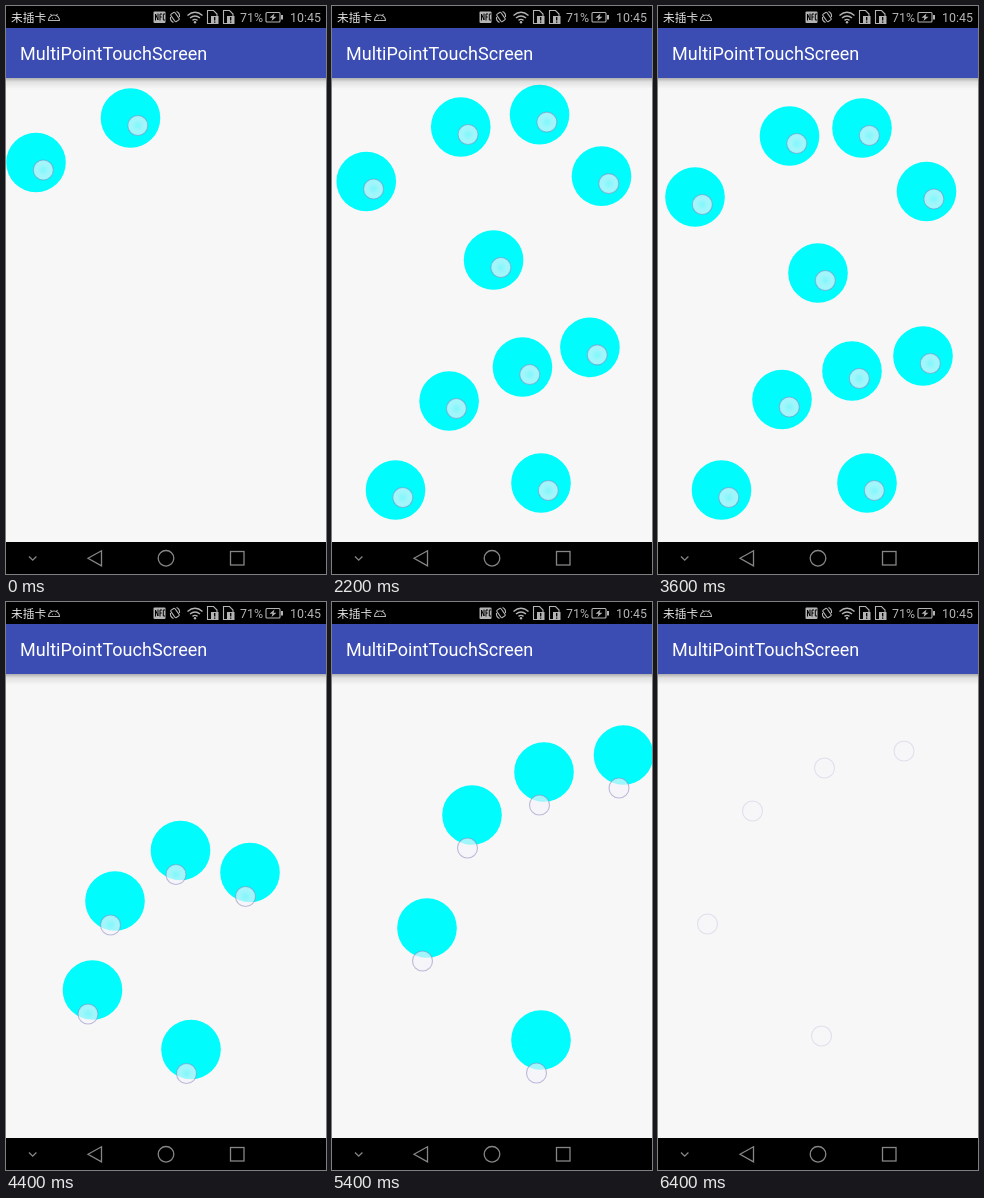
Write an HTML page that moves like this. It is 320 px wide and 568 px high and loops after 6600 ms.

```html
<!DOCTYPE html>
<html lang="en">
<head>
<meta charset="utf-8">
<title>MultiPointTouchScreen</title>
<style>
  html, body { margin: 0; width: 100%; height: 100%; overflow: hidden; background: #f7f7f7; }
  svg { display: block; width: 320px; height: 568px; }
  text { font-family: Roboto, "Noto Sans CJK SC", "Noto Sans CJK", sans-serif; }
  .title { font-size: 18px; letter-spacing: .04px; fill: #fff; }
  .status { font-size: 12.4px; fill: #b4b4b4; }
  .line { fill: none; stroke: #b4b4b4; stroke-width: 1.1; }
  .nav { fill: none; stroke: #868686; stroke-width: 1.3; }
</style>
</head>
<body>
<svg viewBox="0 0 320 568">
  <defs>
    <linearGradient id="shade" x2="0" y2="1">
      <stop offset="0" stop-color="#000" stop-opacity=".3"/>
      <stop offset=".35" stop-color="#000" stop-opacity=".09"/>
      <stop offset="1" stop-color="#000" stop-opacity="0"/>
    </linearGradient>
    <radialGradient id="glow">
      <stop offset="0" stop-color="#f5f3fa" stop-opacity=".52"/>
      <stop offset=".6" stop-color="#f5f3fa" stop-opacity=".66"/>
    </radialGradient>
    <g id="sim">
      <path class="line" d="M.5.5h6L10 4v9.500H.5z"/>
      <path d="M4 6h7.500v8H4z" fill="#b4b4b4"/>
      <path d="M7.700 7v3.500M7.700 11.500v1.200" stroke="#000" stroke-width="1.300"/>
    </g>
  </defs>
  <rect width="320" height="568" fill="#f7f7f7"/>
  <g id="balls" fill="#00fcfc"></g>
  <rect y="72" width="320" height="11" fill="url(#shade)"/>
  <rect y="22" width="320" height="50" fill="#3b4db3"/>
  <text class="title" x="14" y="54">MultiPointTouchScreen</text>

  <rect width="320" height="22" fill="#000"/>
  <text x="5" y="16" font-size="11.7" fill="#e4e4e4">未插卡</text>
  <g class="line">
    <path d="M42.500 14.500a5.500 5.500 0 0 1 11 0zM44.500 8l1.500 2M51.500 8l-1.500 2M46 12.300h.8M49.300 12.300h.8"/>
    <rect x="166.500" y="6.500" width="5" height="9" rx="1" transform="rotate(-35 169 11)"/>
    <path d="M164.500 11q-.5 4 3 5.500M173.500 11q.5-4-3-5.500"/>
    <path d="M181.500 9.500q7.500-6.500 15 0M184 12q5-4.200 10 0M186.500 14.400q2.500-2 5 0" stroke-width="1.400"/>
    <rect x="260" y="6.500" width="14" height="9.500" rx="1"/>
  </g>
  <g fill="#b4b4b4">
    <rect x="147.500" y="5.500" width="12" height="11.500" rx="1"/>
    <path d="M275 9h2v4.500h-2zM268.500 7.500l-5 4.300h3l-1 3.200 5-4.300h-3z"/>
    <circle cx="189" cy="16.300" r="1.200"/>
  </g>
  <path d="M149.500 14.500V8l2.500 6V7.500M154 14.500V8h2M154 11h1.700M159 8h-1.700v6h1.700" fill="none" stroke="#000"/>
  <use href="#sim" x="201" y="4"/>
  <use href="#sim" x="217" y="4"/>
  <text class="status" x="234" y="16">71%</text>
  <text class="status" x="284" y="16">10:45</text>

  <rect y="536" width="320" height="32" fill="#000"/>
  <g class="nav">
    <path d="M23 550.500l3.700 3.700 3.700-3.700"/>
    <path d="M82 552.300l13.500-7.500v15z"/>
    <circle cx="160" cy="552.300" r="7.800"/>
    <rect x="224.500" y="545.500" width="13.500" height="13.500"/>
  </g>
  <g id="rings" fill="url(#glow)" stroke="#8888c0" stroke-opacity=".55" stroke-width="1.100"></g>
</svg>
<script>
const LOOP = 6600, STEP = 200;

const lerp = (a, b, p) => a + (b - a) * p;

// Eased progress from time a to time b.
function ease(t, a, b) {
  const p = Math.min(1, Math.max(0, (t - a) / (b - a)));
  return p * p * (3 - 2 * p);
}

// Ten fingers land one by one, creep up a little, then settle together.
const tap = {
  on: i => 240 * i - 440,
  off: 4000,
  progress: t => ease(t, 1400, 2800),
  shift: t => [0, 5 * Math.max(0, 1 - t / 1400)],
  reach: () => [7.3, 7.5],
  paths: [
    [30, 151.5, 37, 191],
    [124.5, 107, 131.5, 130],
    [213, 88, 204, 122],
    [271, 146.5, 268.5, 185.5],
    [164, 234, 160, 267],
    [247, 328, 265, 350],
    [185, 355, 194, 365],
    [106.5, 397.5, 124, 393.5],
    [209, 477, 209, 477],
    [63.5, 484, 63.5, 484]
  ]
};

// One hand drags five balls behind its fingertips, then slides away.
const drag = {
  on: () => 4200,
  off: 6400,
  progress: t => ease(t, 4400, 5400),
  shift: t => [-41, -37].map(v => v * ease(t, 5400, 6400)),
  reach: t => [-4.5, lerp(24, 33, ease(t, 4400, 5400))],
  paths: [
    [86.5, 388, 95, 326],
    [109, 299, 140, 213],
    [174.5, 248.5, 212, 170],
    [244, 270.5, 291.5, 153],
    [185, 447.5, 209, 438]
  ]
};

function addCircle(group, r) {
  const el = document.createElementNS("http://www.w3.org/2000/svg", "circle");
  el.setAttribute("r", r);
  return document.getElementById(group).appendChild(el);
}

function place(el, x, y, opacity) {
  el.setAttribute("cx", x);
  el.setAttribute("cy", y);
  el.setAttribute("opacity", opacity);
}

const fingers = [tap, drag].flatMap(move => move.paths.map((path, i) => ({
  move, path, on: move.on(i), ball: addCircle("balls", 29.8), ring: addCircle("rings", 10)
})));

// A ring shows one step before its ball and fades one step after it.
function draw(t) {
  for (const { move, path: [x0, y0, x1, y1], on, ball, ring } of fingers) {
    const p = move.progress(t);
    const [sx, sy] = move.shift(t);
    const [rx, ry] = move.reach(t);
    const x = lerp(x0, x1, p) + sx;
    const y = lerp(y0, y1, p) + sy;
    const held = t >= on && t < move.off;
    const fading = t >= move.off && t < move.off + STEP;
    place(ball, x, y, held && t >= on + STEP ? 1 : 0);
    place(ring, x + rx, y + ry, held ? 1 : fading ? 0.38 : 0);
  }
}

const start = performance.now();
function tick() {
  const t = (performance.now() - start) % LOOP;
  draw(Math.floor(t / STEP) * STEP);
  requestAnimationFrame(tick);
}
tick();
</script>
</body>
</html>
```
